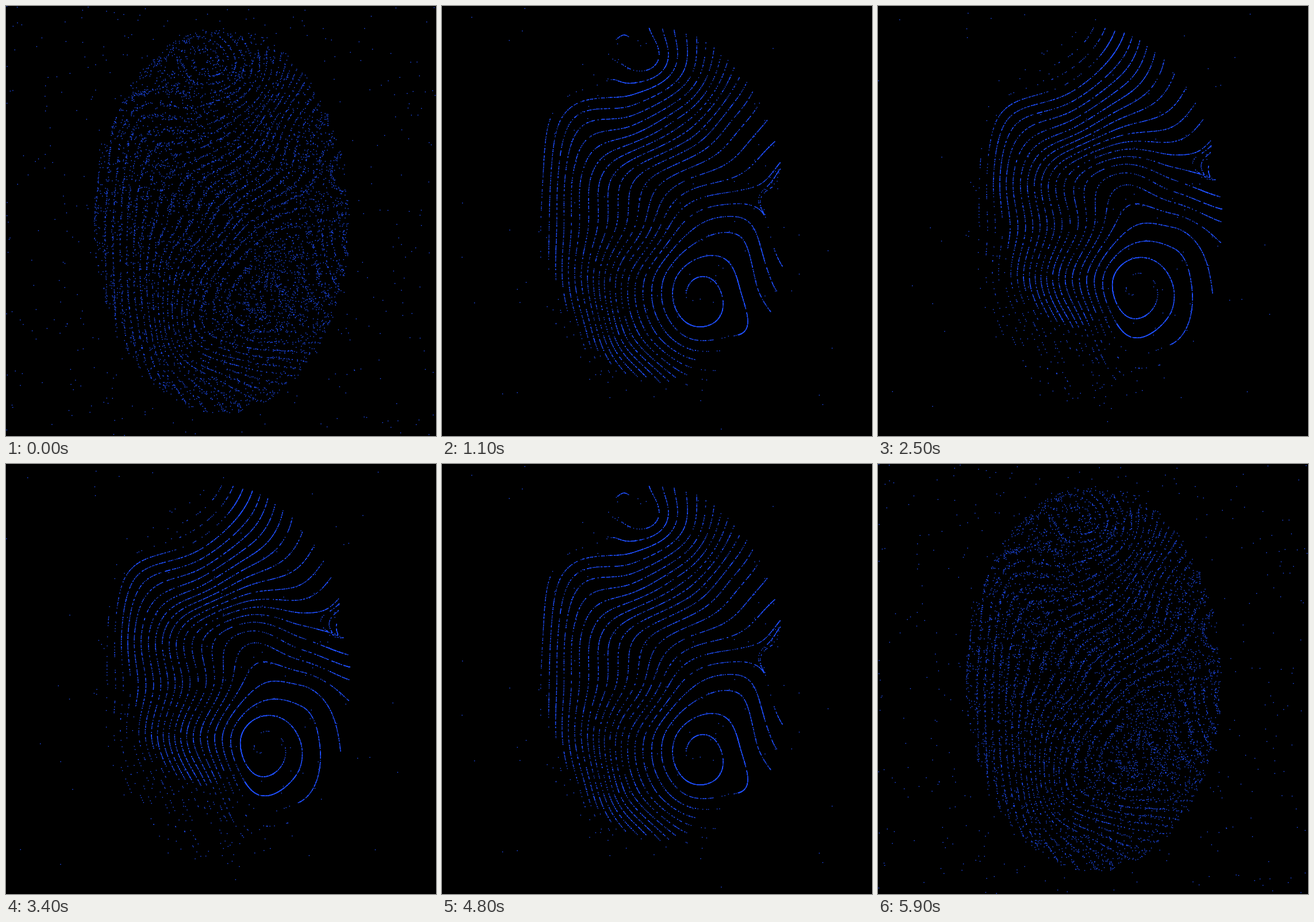
An HTML page with a canvas that plays this animation: 748x748 px, repeating every 6 s.

```html
<!DOCTYPE html>
<html lang="en">
<head>
<meta charset="utf-8">
<title>Fingerprint flow</title>
<style>
html, body { margin: 0; height: 100%; overflow: hidden; background: #000; }
canvas { display: block; }
</style>
</head>
<body>
<canvas id="stage" width="748" height="748"></canvas>
<script>
const SIZE = 748, COUNT = 8000, STEPS = 30, FRAME_MS = 100;
const ctx = document.getElementById('stage').getContext('2d');

// Heading, in turns, on a 6 x 9 lattice: early and late state of the field.
const COLS = 6, ROWS = 9, CELL = 90, LEFT = 150, TOP = 30;
const early = [
  22, 21.5, 20.8, 17.3, 13, 9,
  21.5, 20.6, 20.3, 17.8, 10.8, 5.5,
  20.8, 16.7, 16, 12.8, 7.3, 5.2,
  20.7, 14.7, 10.7, 7.8, 5.4, 3.3,
  20.4, 14.2, 9, 3.4, 2, 5.4,
  20.6, 13.6, 4.9, 0.5, 1.1, 3.9,
  20.8, 15, 5.4, 1.4, 1.2, 1.6,
  22, 17, 11.5, 7.2, 6, 5,
  23, 19, 14.5, 11, 9.5, 8
];
const late = [
  24, 24, 23.6, 19.6, 13.3, 9,
  23, 22.3, 20.6, 17, 13, 10.5,
  22.5, 17.7, 15.4, 12.1, 11, 9,
  22.3, 15.4, 8.7, 5.5, 7.1, 8.3,
  22, 16, 9, 3.3, 2.85, 4.6,
  22.3, 15, 6.4, 0.5, 1.4, 3.6,
  23.5, 18, 10, 2, 2, 4,
  25, 21, 14, 5.8, 5, 6,
  27, 24, 19, 11, 9, 9
];

let seed = 7;
function random() {
  seed = (seed + 0x6D2B79F5) | 0;
  let h = Math.imul(seed ^ (seed >>> 15), 1 | seed);
  h = (h + Math.imul(h ^ (h >>> 7), 61 | h)) ^ h;
  return ((h ^ (h >>> 14)) >>> 0) / 4294967296;
}

const clamp = (v, lo, hi) => Math.max(lo, Math.min(hi, v));
const spline = (a, b, c, d, t) =>
  b + 0.5 * t * (c - a + t * (2 * a - 5 * b + 4 * c - d + t * (3 * (b - c) + d - a)));

function bump(x, y, cx, cy, r) {
  const d = ((x - cx) ** 2 + (y - cy) ** 2) / (r * r);
  return d > 9 ? 0 : Math.exp(-d);
}

function makeField(blend) {
  const nodes = early.map((v, i) => v + (late[i] - v) * blend);
  const fade = Math.max(0, 1 - blend);
  const row = (j, i, t) => {
    const o = clamp(j, 0, ROWS - 1) * COLS;
    return spline(nodes[o + Math.max(i - 1, 0)], nodes[o + i], nodes[o + i + 1],
      nodes[o + Math.min(i + 2, COLS - 1)], t);
  };
  return (x, y) => {
    const u = clamp((x - LEFT) / CELL, 0, COLS - 1.001);
    const v = clamp((y - TOP) / CELL, 0, ROWS - 1.001);
    const i = Math.floor(u), j = Math.floor(v), t = u - i;
    return spline(row(j - 1, i, t), row(j, i, t), row(j + 1, i, t), row(j + 2, i, t), v - j)
      + fade * (1.6 * bump(x, y, 360, 92, 38) - 0.9 * bump(x, y, 287, 114, 30))
      - 0.8 * bump(x, y, 448 + 15 * blend, 516 - 20 * blend, 45);
  };
}

const inside = (x, y) => ((x - 375.5) / 223) ** 2 + ((y - 373.5) / 336) ** 2 < 1;
const points = Float32Array.from({ length: COUNT * 2 }, () => random() * SIZE);

// Particles follow the heading; any that leave the oval restart anywhere.
function advance(field, steps) {
  for (let s = 0; s < steps; s++) {
    for (let i = 0; i < points.length; i += 2) {
      const angle = 2 * Math.PI * field(points[i], points[i + 1]);
      points[i] += Math.cos(angle);
      points[i + 1] += Math.sin(angle);
      if (!inside(points[i], points[i + 1])) {
        points[i] = random() * SIZE;
        points[i + 1] = random() * SIZE;
      }
    }
  }
}

const poses = [];
function poseAt(index) {
  while (poses.length <= index) {
    const n = poses.length;
    advance(makeField((n - 6) / 19), n ? 8 : 5);
    poses.push(points.slice());
  }
  return poses[index];
}

let shown = -1;
function draw(now) {
  const step = Math.floor(now / FRAME_MS) % (2 * STEPS);
  const index = Math.min(step, 2 * STEPS - 1 - step);
  if (index !== shown) {
    shown = index;
    const pose = poseAt(index);
    ctx.fillStyle = '#000';
    ctx.fillRect(0, 0, SIZE, SIZE);
    ctx.fillStyle = '#2050ff';
    for (let i = 0; i < pose.length; i += 2) {
      ctx.fillRect(pose[i] - 0.7, pose[i + 1] - 0.7, 1.4, 1.4);
    }
  }
  requestAnimationFrame(() => draw(performance.now()));
}
draw(0);
</script>
</body>
</html>
```
